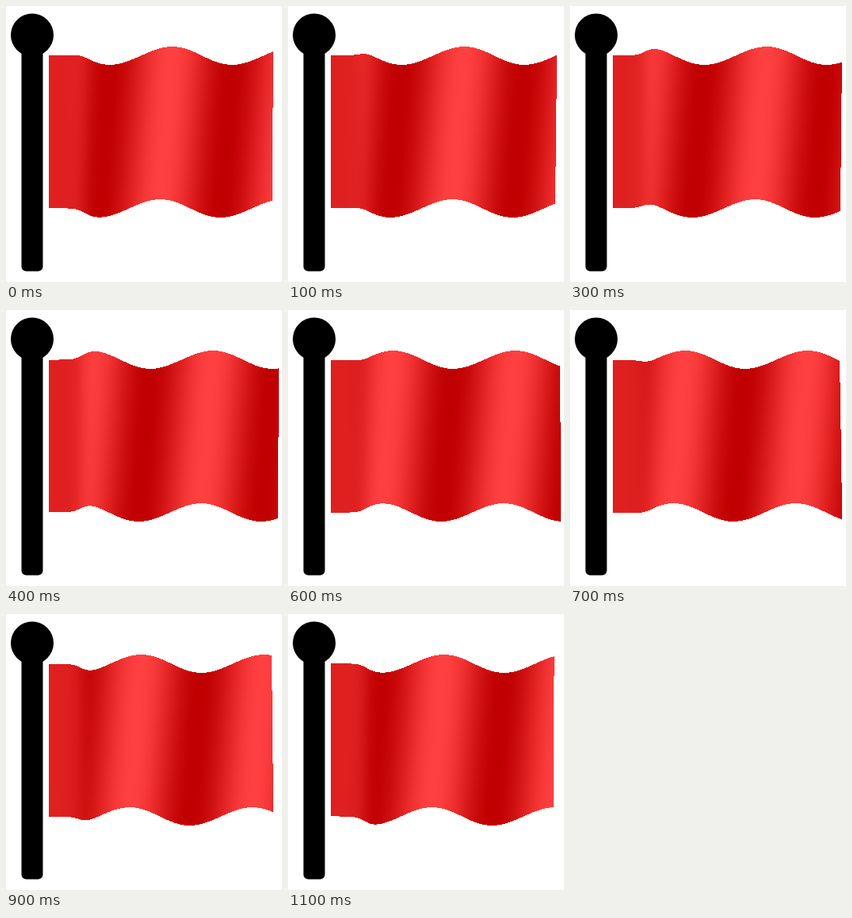
An HTML page with a canvas for the animation above (1.2 s loop, 348x347 px).

```html
<!DOCTYPE html>
<html lang="en">
<head>
<meta charset="utf-8">
<title>Waving flag</title>
<style>
  html, body { margin: 0; height: 100%; overflow: hidden; background: #fff; }
  canvas { display: block; }
</style>
</head>
<body>
<canvas id="stage" width="348" height="347"></canvas>
<script>
const W = 348, H = 347;
const STEPS = 12, STEP_MS = 100;
const FLAG = { left: 54, top: 62.5, right: 339.5, bottom: 254.5 };
const WAVE = { length: 154.5, slant: 0.077, trough: 285.9, dx: 4.7, dy: 11.4 };

const ctx = document.getElementById('stage').getContext('2d');
const image = ctx.createImageData(W, H);
const pixels = new Uint32Array(image.data.buffer);

// The cloth is held still near the pole and moves freely further out.
const freedom = Array.from({ length: W }, (_, x) => 1 / (1 + Math.exp((95 - x) * 0.17)));

function drawFlag(step) {
  const shift = WAVE.trough + WAVE.length * step / STEPS;
  pixels.fill(0xffffffff);
  for (let y = 45; y < 272; y++) {
    for (let x = FLAG.left; x < W; x++) {
      const px = x + 0.5, py = y + 0.5;
      const along = px + WAVE.slant * (py - FLAG.top) - shift;
      const wave = freedom[x] * Math.cos(2 * Math.PI * along / WAVE.length);
      const u = px - WAVE.dx * wave, v = py - WAVE.dy * wave;
      if (u < FLAG.right && v >= FLAG.top && v < FLAG.bottom) {
        const red = Math.round(223.5 - 31.5 * wave);
        const dim = Math.round(32 - 32 * wave);
        pixels[y * W + x] = (255 << 24 | dim << 16 | dim << 8 | red) >>> 0;
      }
    }
  }
  ctx.putImageData(image, 0, 0);
}

function drawPole() {
  ctx.fillStyle = '#000';
  ctx.beginPath();
  ctx.arc(33, 36.5, 27, 0, 2 * Math.PI);
  ctx.fill();
  ctx.beginPath();
  ctx.roundRect(19.5, 40, 27, 293.5, 6);
  ctx.fill();
}

let shown = -1;
function tick() {
  const step = Math.floor(performance.now() / STEP_MS) % STEPS;
  if (step !== shown) {
    shown = step;
    drawFlag(step);
    drawPole();
  }
  requestAnimationFrame(tick);
}
tick();
</script>
</body>
</html>
```
